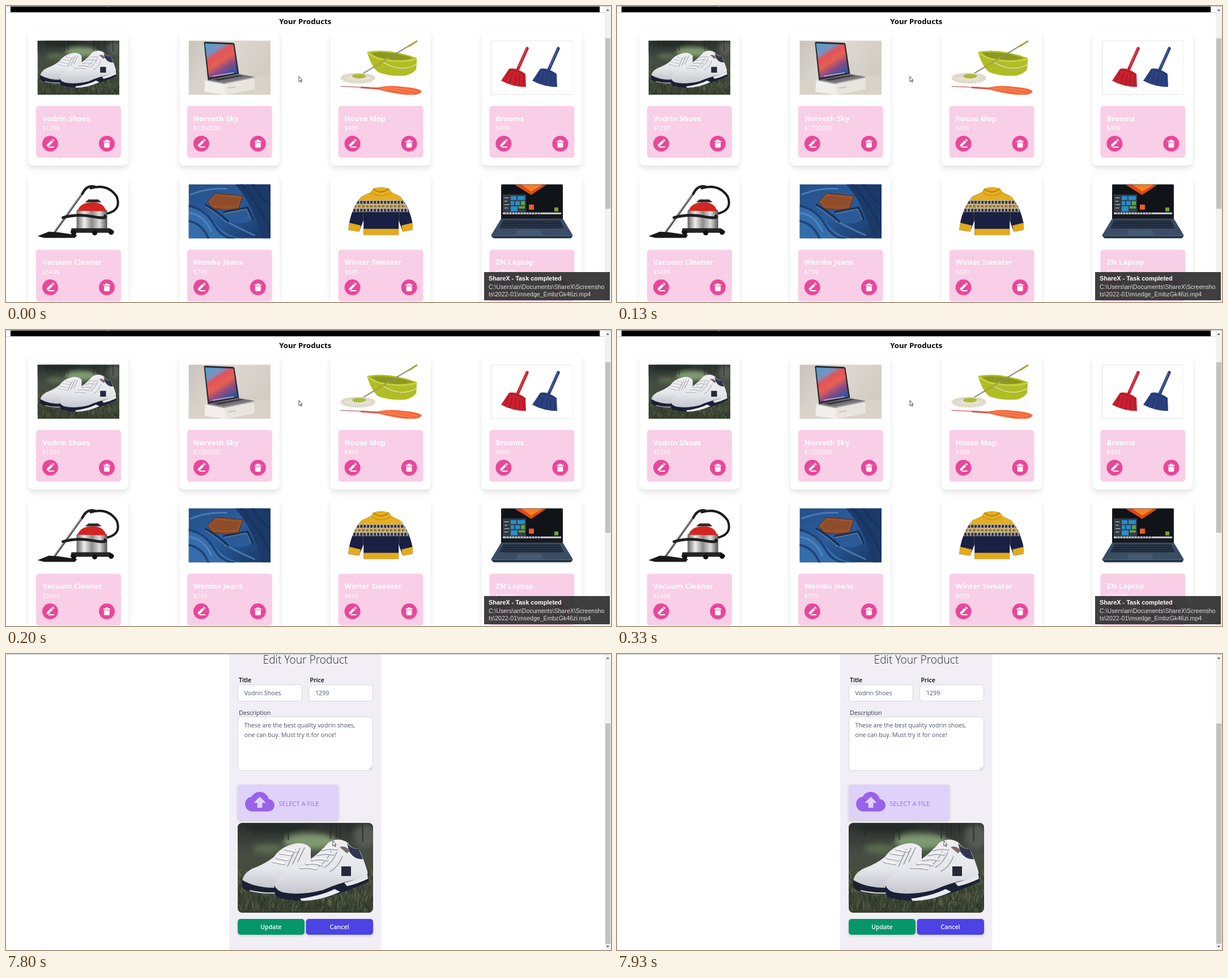
Write an HTML page that moves like this. It is 1068 px wide and 524 px high and loops after 8000 ms.

```html
<!DOCTYPE html>
<html lang="en">
<head>
<meta charset="utf-8">
<title>Product manager</title>
<style>
  html, body { margin: 0; width: 100%; height: 100%; overflow: hidden; background: #fff; }
  svg { display: block; width: 100vw; height: 100vh; font: 10.6px "Open Sans", "Noto Sans", sans-serif; }
  .bold { font-weight: 700; }
  .semi { font-weight: 600; }
  .card { fill: #fff; filter: drop-shadow(0 5px 5px rgba(0,0,0,.11)); }
  .raised { filter: drop-shadow(0 2px 2px rgba(0,0,0,.14)); }
  .field { fill: #fff; stroke: #d4d5dc; }
  .toast { font-family: "Liberation Sans", Arial, sans-serif; }
  .line { fill: none; stroke-linecap: round; stroke-linejoin: round; }
</style>
</head>
<body>
<svg viewBox="0 0 1068 524" preserveAspectRatio="none">
  <defs>
    <linearGradient id="woods" x2="0" y2="1">
      <stop stop-color="#2b302d"/><stop offset=".35" stop-color="#464d43"/>
      <stop offset=".6" stop-color="#454c3a"/><stop offset="1" stop-color="#363f2f"/>
    </linearGradient>
    <linearGradient id="leather" x2="0" y2="1">
      <stop stop-color="#eeeef1"/><stop offset=".55" stop-color="#e6e7eb"/><stop offset="1" stop-color="#bfc2ca"/>
    </linearGradient>
    <linearGradient id="wallpaper" x2=".6" y2="1">
      <stop stop-color="#4d9fd2"/><stop offset=".28" stop-color="#7a91bd"/><stop offset=".4" stop-color="#e2535c"/>
      <stop offset=".6" stop-color="#e5604f"/><stop offset=".78" stop-color="#8d4b86"/><stop offset="1" stop-color="#34549c"/>
    </linearGradient>
    <linearGradient id="wall" x2="1" y2=".4">
      <stop stop-color="#c9c3ba"/><stop offset=".5" stop-color="#dcd7d0"/><stop offset="1" stop-color="#d3ccc3"/>
    </linearGradient>
    <linearGradient id="steel">
      <stop stop-color="#666"/><stop offset=".25" stop-color="#eee"/><stop offset=".5" stop-color="#8c8c8c"/>
      <stop offset=".75" stop-color="#ddd"/><stop offset="1" stop-color="#555"/>
    </linearGradient>
    <linearGradient id="denim" x2="1" y2="1">
      <stop stop-color="#244f86"/><stop offset=".45" stop-color="#2a5d9e"/><stop offset="1" stop-color="#173661"/>
    </linearGradient>
    <filter id="soft" x="-50%" y="-50%" width="200%" height="200%"><feGaussianBlur stdDeviation="5"/></filter>
    <clipPath id="photoClip"><rect width="239" height="159" rx="8"/></clipPath>
    <clipPath id="frameClip"><rect width="144.5" height="96"/></clipPath>
    <clipPath id="sweaterClip">
      <path d="M59 8Q72 3 87 8L91 14 107 22Q124 42 129 72L128 81 111 84 104 64V90H42V64L34 84 15 81Q18 46 38 22L55 14Z"/>
    </clipPath>

    <g id="shoes">
      <rect width="239" height="159" fill="url(#woods)"/>
      <g filter="url(#soft)">
        <ellipse cx="128" cy="33" rx="48" ry="14" fill="#7f9870"/>
        <ellipse cx="55" cy="46" rx="28" ry="9" fill="#596a4d"/>
        <ellipse cx="225" cy="24" rx="20" ry="22" fill="#575a55"/>
        <ellipse cx="70" cy="8" rx="60" ry="9" fill="#242b25"/>
      </g>
      <path id="trunks" class="line" stroke="#262c27" stroke-width="3" opacity=".6"/>
      <path id="blades" class="line" stroke="#77825f" stroke-width=".8" opacity=".75"/>
      <path id="darkBlades" class="line" stroke="#20291c" stroke-width="1" opacity=".7"/>
      <path d="M8 106Q8 90 26 81 50 72 64 60 76 43 96 38 118 32 129 45V78Q90 85 70 118 30 118 8 106Z" fill="url(#leather)"/>
      <path d="M8 101Q5 114 14 119 40 128 68 125V115Q30 115 8 101Z" fill="#1b2034"/>
      <path class="line" d="M22 120q20 5 44 4" stroke="#d5d7dc" stroke-width="2"/>
      <path class="line" d="M88 77l14-30M97 73l13-28M106 69l12-25" stroke="#8f939d" stroke-width="1.5"/>
      <path class="line" d="M62 69l20 4M68 62l20 4M75 54l20 3M84 47l20 4" stroke="#a9adb7" stroke-width="4"/>
      <path class="line" d="M62 68l20 4M68 61l20 4M75 53l20 3M84 46l20 4" stroke="#fff" stroke-width="2.5"/>
      <path d="M66 118Q63 101 80 91 106 78 126 66 146 52 160 35 178 24 194 35 201 47 213 45 222 62 229 86 231 98 222 104 190 112 160 122 110 134 74 130Z" fill="url(#leather)"/>
      <path d="M193 36Q202 48 213 45L221 64Q207 66 197 51Z" fill="#303550"/>
      <path d="M180 43Q189 39 198 49L193 54Z" fill="#7c6c68"/>
      <path d="M65 111Q62 128 74 133 110 143 160 131 205 117 231 104V89Q222 98 205 101 180 106 150 119 110 129 80 123 69 120 65 111Z" fill="#1a2035"/>
      <path d="M110 134Q148 129 171 117L181 122Q146 138 113 138Z" fill="#e9eaee"/>
      <path d="M188 106Q209 101 229 91L230 99Q211 108 193 112Z" fill="#e5e6e9"/>
      <path class="line" d="M153 79q14-8 22-27M163 86q15-8 22-27M143 77q14-8 22-27" stroke="#989ca7" stroke-width="1.5"/>
      <rect x="183" y="77" width="17" height="17" fill="#252a3a"/>
      <path class="line" d="M111 80q15-2 27 2M121 73q15-3 27 2M131 66q14-4 27 0M141 57q12-5 27-1M150 48q12-5 25-1" stroke="#a9adb7" stroke-width="4.4"/>
      <path class="line" d="M111 79q15-2 27 2M121 72q15-3 27 2M131 65q14-4 27 0M141 56q12-5 27-1M150 47q12-5 25-1" stroke="#fff" stroke-width="2.4"/>
    </g>

    <g id="notebook">
      <rect width="145" height="96" fill="url(#wall)"/>
      <path d="M0 73L145 61V96H0Z" fill="#d9d2c9"/>
      <path d="M29 70L63 76 116 65V86L66 96 28 91Z" fill="#f2eee9"/>
      <path d="M63 76L116 65V86L66 96Z" fill="#e9e4de"/>
      <path d="M27 4Q27 2 30 2L78 4Q80 4 81 6L89 59 34 70Z" fill="#292a2f"/>
      <path d="M29 5L79 7 86 57 36 66Z" fill="url(#wallpaper)"/>
      <path class="line" d="M43 63l36-6" stroke="#b9bbce" stroke-width="1.5"/>
      <path d="M33 70L88 59 116 64 62 75Z" fill="#777478"/>
      <path d="M43 69L89 61 98 62 53 71Z" fill="#3a393e"/>
      <path d="M33 70L62 75 116 64V66L62 77 33 71Z" fill="#a4a0a2"/>
      <text x="70" y="85" font-size="3.5" fill="#857f79" transform="rotate(-8 70 85)">Norveth</text>
    </g>

    <g id="mop">
      <path d="M48 20Q88 13 136 31L135 50Q131 58 116 62 88 64 68 56 56 47 48 20Z" fill="#b0bd24"/>
      <path d="M55 22Q88 17 129 31 110 37 84 33 64 31 55 22Z" fill="#8c981f"/>
      <path class="line" d="M50 22Q63 33 86 35 111 39 135 33" stroke="#c9d346" stroke-width="2.5"/>
      <path class="line" d="M76 38Q108 58 136 42" stroke="#dcdcc0" stroke-width="1.5"/>
      <path class="line" d="M136 1L35 62" stroke="#888e79" stroke-width="2"/>
      <path class="line" d="M136 1l-14 9M86 31L60 47" stroke="#a6a739" stroke-width="3"/>
      <ellipse cx="32" cy="66" rx="31" ry="9" fill="#e6e2d2"/>
      <ellipse cx="32" cy="67" rx="27" ry="7" fill="none" stroke="#d6d1bd" stroke-width="5" stroke-dasharray="2 2"/>
      <ellipse cx="34" cy="63" rx="12" ry="4" fill="#a9ba36"/>
      <path class="line" d="M2 81L67 84" stroke="#c97a79" stroke-width="1.6"/>
      <path class="line" d="M38 83l30 2" stroke="#dc554b" stroke-width="3"/>
      <path d="M66 83Q88 78 113 82 140 84 145 90 141 98 117 96 90 93 66 86Z" fill="#f4683b"/>
      <path class="line" d="M74 84q32-2 63 7M77 86q29 2 52 8" stroke="#ff9368"/>
    </g>

    <g id="broom">
      <path class="line" d="M64 14L47 52" stroke="currentColor" stroke-width="5.5"/>
      <path class="line" d="M63 14L49 47" stroke="#fff" opacity=".3"/>
      <path d="M32 50Q44 47 61 59L62 82Q38 82 18 71Z" fill="currentColor"/>
      <path class="line" d="M32 55l-7 17M38 58l-5 18M45 60l-3 19M51 62l-1 18M57 64l1 16M32 52q17 1 28 9" stroke="#000" opacity=".3"/>
    </g>
    <g id="brooms">
      <rect x=".5" y=".5" width="144" height="95" fill="#fff" stroke="#e1e1e1"/>
      <use href="#broom" color="#c9202f"/><use href="#broom" x="55" color="#2b4180"/>
    </g>

    <g id="vacuum">
      <path class="line" d="M94 7Q124-2 140 22 148 44 126 51 114 54 104 46" stroke="#191919" stroke-width="4"/>
      <path class="line" d="M30 85L85 8" stroke="#555" stroke-width="4"/>
      <path class="line" d="M29 84L84 8" stroke="#b9b9b9" stroke-width="1.2"/>
      <path class="line" d="M79 17Q86 1 101 4" stroke="#202020" stroke-width="4"/>
      <path d="M0 92L20 84 36 85 70 90 66 95 12 95Z" fill="#191919"/>
      <rect x="69" y="45" width="54" height="36" rx="3" fill="url(#steel)"/>
      <path d="M71 47Q75 32 98 32 117 32 121 48Z" fill="#d32622"/>
      <path d="M84 32l6-5h17l6 5z" fill="#272727"/>
      <path class="line" d="M45 59Q70 52 97 57T119 56" stroke="#202020" stroke-width="5"/>
      <path d="M60 78H128L135 83V86H58Z" fill="#242424"/>
      <g fill="#111"><circle cx="64" cy="86" r="4.5"/><circle cx="101" cy="86" r="4.5"/><circle cx="130" cy="85" r="4.5"/></g>
    </g>

    <g id="jeans">
      <rect width="145" height="96" fill="url(#denim)"/>
      <path d="M82 0H145V96H130Q113 34 82 0Z" fill="#1b3a67"/>
      <path d="M0 40Q22 36 45 66T100 96H0Z" fill="#356cab"/>
      <path class="line" d="M0 38Q30 45 44 70T80 96M0 65Q24 69 35 96M93 0Q128 40 145 83M113 0Q126 24 145 37" stroke="#15335f" stroke-width="4" opacity=".7"/>
      <path class="line" d="M4 18Q35 6 67 8M0 51Q26 53 40 83M66 65Q88 78 116 90" stroke="#6998cf" stroke-width="3" opacity=".55"/>
      <path d="M62 48L104 40 113 62Q94 74 70 66Z" fill="#2a5b98"/>
      <path class="line" d="M62 49L104 41 113 62M30 36Q55 51 70 66" stroke="#152f58" stroke-width="3"/>
      <path class="line" d="M64 52L102 44 110 61M31 40Q55 56 66 68" stroke="#a39a79" stroke-dasharray="2 2"/>
      <path d="M33 31L47 16 96 20 88 43 66 46 43 43Z" fill="#8f4c2a" stroke="#582b1c"/>
      <path class="line" d="M37 31L49 19 92 23 86 40 45 40Z" stroke="#b06e43" stroke-dasharray="2 2"/>
    </g>

    <g id="sweater">
      <g clip-path="url(#sweaterClip)">
        <rect width="145" height="96" fill="#182044"/>
        <rect width="145" height="29" fill="#e5af20"/>
        <rect y="28" width="145" height="21" fill="#c5b48a"/>
        <g fill="none" stroke="#29345c">
          <path d="M12 32H135" stroke-width="5" stroke-dasharray="4 2"/>
          <path d="M12 39H135" stroke="#c3932b" stroke-width="5" stroke-dasharray="5 2"/>
          <path d="M12 39H135" stroke-width="2" stroke-dasharray="2 5"/>
          <path d="M12 46H135" stroke-width="5" stroke-dasharray="4 2"/>
        </g>
        <path d="M12 67l25 6-3 14-24-6zM133 67l-24 6 2 14 24-6zM41 79h64v14H41z" fill="#e3aa1b"/>
        <path class="line" d="M41 28V77M105 28V77M56 15Q72 26 90 15" stroke="#8a6517" opacity=".55"/>
        <path class="line" d="M59 8Q72 19 86 8" stroke="#b48116" stroke-width="2"/>
      </g>
    </g>

    <g id="laptop">
      <rect x="18" width="109" height="62" rx="2" fill="#17191e"/>
      <rect x="21" y="2" width="103" height="51" fill="#101317"/>
      <path d="M42 1H98L71 19Z" fill="#d84a17"/><path d="M54 1H91L71 13Z" fill="#fa7f23"/>
      <rect x="21" y="18" width="41" height="32" fill="#343c44"/>
      <path d="M35 21h10v7H35zM47 21h13v7H47zM35 30h6v7h-6zM43 30h8v7h-8zM35 39h12v9H35z" fill="#258fd0"/>
      <path d="M53 30h7v7h-7zM49 39h11v4H49z" fill="#62a345"/>
      <path class="line" d="M24 24h7M24 30h5M24 36h8M24 42h6" stroke="#d3d8dd"/>
      <rect x="67" y="36" width="9" height="9" fill="#ef5a27"/>
      <rect x="21" y="50" width="103" height="3" fill="#cfd5da"/>
      <path d="M26 51.5h62" stroke="#4c6d8d" stroke-width="2" stroke-dasharray="2 3"/>
      <rect x="112" y="41" width="7" height="7" fill="#71a332"/>
      <path d="M18 61H127L145 91H0Z" fill="#3a4d64"/>
      <path d="M22 64H122L129 78H15Z" fill="#1e2938"/>
      <path d="M22 67H123M20 71H126M18 75H127" stroke="#3d4b5f" stroke-dasharray="4 1.5"/>
      <path d="M47 81H88L91 90H44Z" fill="#465a72"/>
      <path d="M0 91H145L141 96H5Z" fill="#25364a"/>
    </g>

    <g id="editButton">
      <circle r="14" fill="#e94798"/>
      <path d="M-6 2L2-6 5-3-3 5H-6ZM3-7l1-1q1-.6 2 .3l1 1q.8.9 0 1.8l-1 1zM-2 5H7V7H-4Z" fill="#fff"/>
    </g>
    <g id="deleteButton">
      <circle r="14" fill="#e94798"/>
      <path d="M-6-5H-3L-2-7H2L3-5H6V-3H-6ZM-5-2H5V5Q5 7 3 7H-3Q-5 7-5 5Z" fill="#fff"/>
    </g>
    <path id="cursor" d="M0 0V9.5L2.2 7.5 3.7 10.5 5 9.9 3.7 7H6Z" fill="#fff" stroke="#222" stroke-width=".8"/>
  </defs>

  <rect width="1068" height="524" fill="#fff"/>

  <g id="listPage">
    <rect x="8" y="1" width="1040" height="10" fill="#000"/>
    <rect y="11" width="1057" height="1" fill="#d0d0d0"/>
    <rect x="179" width="3" height="1.5" fill="#999"/>
    <text class="bold" x="528.2" y="32" font-size="13.2" text-anchor="middle">Your Products</text>
    <g id="cards"></g>
    <use href="#cursor" x="517" y="124.5"/>
  </g>

  <g id="editPage">
    <rect x="394" width="268.5" height="524" fill="#f1eff5"/>
    <text x="528.5" y="16.5" font-size="19.2" font-weight="300" text-anchor="middle" fill="#252a35">Edit Your Product</text>
    <g class="semi"><text x="411" y="50">Title</text><text x="536.5" y="50">Price</text></g>
    <text x="411" y="107.5" font-weight="500" fill="#303846">Description</text>
    <rect class="field" x="409.5" y="54.5" width="113" height="29" rx="5"/>
    <rect class="field" x="534.5" y="54.5" width="113" height="29" rx="5"/>
    <rect class="field" x="409.5" y="111.5" width="238" height="95" rx="5"/>
    <path d="M641 205l5-5M644 205l2-2" stroke="#777" stroke-width=".8"/>
    <g fill="#4b5563">
      <text x="420.5" y="73">Vodrin Shoes</text><text x="546" y="73">1299</text>
      <text x="420.5" y="130">These are the best quality vodrin shoes,</text>
      <text x="420.5" y="147">one can buy. Must try it for once!</text>
    </g>
    <rect class="raised" x="409" y="231" width="178" height="63" rx="4" fill="#dfd2f9"/>
    <path transform="translate(422 235.3) scale(2.167)" fill="#9962e9" d="M19.35 10.04C18.67 6.59 15.64 4 12 4 9.11 4 6.6 5.64 5.35 8.04 2.34 8.36 0 10.91 0 14c0 3.31 2.69 6 6 6h13c2.76 0 5-2.24 5-5 0-2.64-2.05-4.78-4.65-4.96zM14 13v4h-4v-4H7l5-5 5 5h-3z"/>
    <text x="481.5" y="269" letter-spacing=".25" fill="#9962e9">SELECT A FILE</text>
    <g transform="translate(409 299)"><g clip-path="url(#photoClip)"><use href="#shoes"/></g></g>
    <rect class="raised" x="409" y="469" width="118" height="28" rx="5" fill="#059669"/>
    <rect class="raised" x="529.5" y="469" width="118.5" height="28" rx="5" fill="#4b43e3"/>
    <g class="semi" fill="#fff" text-anchor="middle"><text x="468" y="487">Update</text><text x="588.5" y="487">Cancel</text></g>
    <use href="#cursor" x="577" y="330.5"/>
  </g>

  <rect width="1068" height="1" fill="#c4c4c4"/>
  <rect x="1057" y="1" width="11" height="523" fill="#f1f1f1"/>
  <rect id="thumb" x="1058" width="9" fill="#c1c1c1"/>
  <path d="M1059.5 8.5l2.7-3 2.7 3zM1059.5 516.5l2.7 3 2.7-3z" fill="#555"/>

  <g id="toast" class="toast" fill="#ddd">
    <rect x="844" y="471" width="222" height="50" fill="#333" opacity=".94"/>
    <text class="bold" x="852" y="486" font-size="10.9" fill="#fff">ShareX - Task completed</text>
    <text x="852" y="501">C:\Users\an\Documents\ShareX\Screensho</text>
    <text x="852" y="513.5">ts\2022-01\msedge_EmbzGk46zi.mp4</text>
  </g>
</svg>
<script>
const LOOP = 8000, EDIT_START = 7800;
const byId = id => document.getElementById(id);

const products = [
  ['Vodrin Shoes', 1299, 'shoes'], ['Norveth Sky', 1350000, 'notebook'],
  ['House Mop', 499, 'mop'], ['Brooms', 499, 'brooms'],
  ['Vacuum Cleaner', 5499, 'vacuum'], ['Wembo Jeans', 799, 'jeans'],
  ['Winter Sweater', 699, 'sweater'], ['ZN Laptop', 70000, 'laptop']
];

byId('cards').innerHTML = products.map(([name, price, art], i) => {
  const x = 39.2 + (i % 4) * 266.8, y = 45 + Math.floor(i / 4) * 254.4;
  const scale = art === 'shoes' ? 144.5 / 239 : 1;
  return `<g transform="translate(${x} ${y})">
    <rect class="card" width="177" height="237.5" rx="9"/>
    <g transform="translate(16.4 16.2)" clip-path="url(#frameClip)">
      <use href="#${art}" transform="scale(${scale})"/>
    </g>
    <rect x="13.8" y="132" width="150" height="91.5" rx="5" fill="#f9cee7"/>
    <g fill="#fff">
      <text class="bold" x="24.8" y="158.5" font-size="13">${name}</text>
      <text x="24.8" y="175.2">$${price}</text>
    </g>
    <use href="#editButton" x="38.8" y="198.7"/>
    <use href="#deleteButton" x="138.8" y="198.7"/>
  </g>`;
}).join('');

let seed = 7;
const random = () => (seed = seed * 16807 % 2147483647) / 2147483647;
const strokes = (count, draw) => Array.from({ length: count }, draw).join('');
const blade = () =>
  `M${(random() * 239).toFixed(1)} ${(88 + random() * 71).toFixed(1)}q${(random() * 4 - 2).toFixed(1)}-4 ${(random() * 8 - 4).toFixed(1)}-8`;
byId('trunks').setAttribute('d', strokes(13, () => `M${(random() * 239).toFixed(1)} 0v${(12 + random() * 24).toFixed(1)}`));
byId('blades').setAttribute('d', strokes(300, blade));
byId('darkBlades').setAttribute('d', strokes(260, blade));

function render() {
  const editing = performance.now() % LOOP >= EDIT_START;
  byId('listPage').style.display = byId('toast').style.display = editing ? 'none' : '';
  byId('editPage').style.display = editing ? '' : 'none';
  byId('thumb').setAttribute('y', editing ? 123 : 57);
  byId('thumb').setAttribute('height', editing ? 390 : 302);
  requestAnimationFrame(render);
}
render();
</script>
</body>
</html>
```
